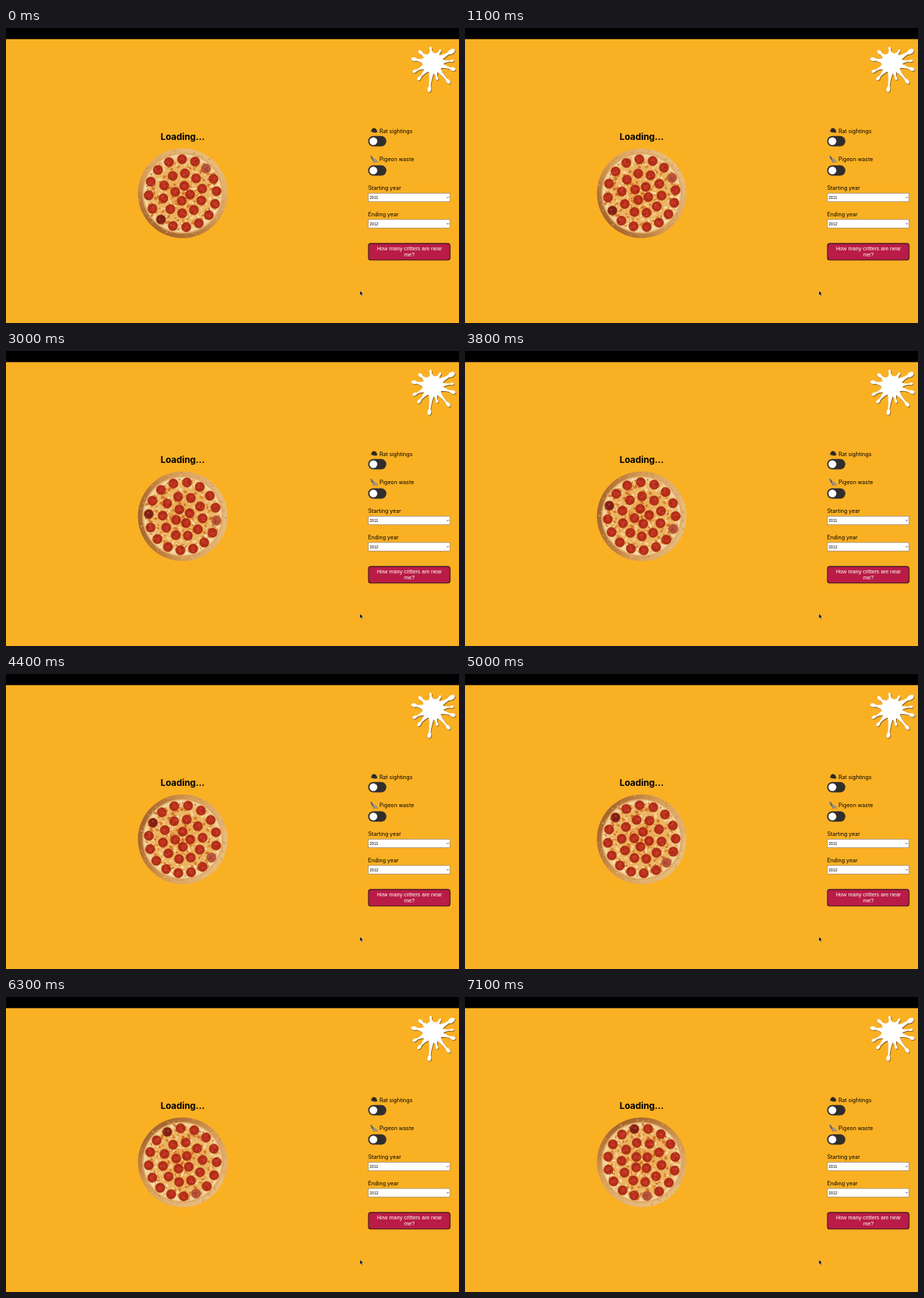
Animation, 600 px wide and 390 px high, one loop 7.2 s. Source, as an HTML page:

```html
<!DOCTYPE html>
<html lang="en">
<head>
<meta charset="utf-8">
<title>Loading</title>
<style>
  html, body { margin: 0; width: 100%; height: 100%; overflow: hidden; background: #fab023; }
  svg { display: block; width: 100%; height: 100%; }
  .label { font: 7.2px Inter, sans-serif; }
  .title { font: 700 11.9px Inter, sans-serif; text-anchor: middle; }
  .field { font: 5.2px "Liberation Sans", Arial, sans-serif; }
  .button { font: 7.2px "Liberation Sans", Arial, sans-serif; fill: #fff; text-anchor: middle; }
</style>
</head>
<body>
<svg viewBox="0 0 600 390" xmlns="http://www.w3.org/2000/svg">
  <defs>
    <linearGradient id="crust" x1="0.75" y1="0.05" x2="0.25" y2="0.95">
      <stop offset="0" stop-color="#e8bd80"/>
      <stop offset="0.55" stop-color="#d79c55"/>
      <stop offset="1" stop-color="#a2632c"/>
    </linearGradient>
    <radialGradient id="cheese">
      <stop offset="0" stop-color="#e9a24a"/>
      <stop offset="0.8" stop-color="#ecb868"/>
      <stop offset="0.94" stop-color="#f3d8a6"/>
      <stop offset="1" stop-color="#d8984f"/>
    </radialGradient>
    <radialGradient id="meat">
      <stop offset="0" stop-color="#c63a25"/>
      <stop offset="0.7" stop-color="#b92d1a"/>
      <stop offset="1" stop-color="#8d2212"/>
    </radialGradient>
    <filter id="shade" x="-20%" y="-20%" width="140%" height="140%">
      <feDropShadow dx="0.7" dy="0.9" stdDeviation="0.5" flood-color="#4a3000" flood-opacity="0.8"/>
    </filter>
  </defs>

  <rect width="600" height="390" fill="#fab023"/>
  <rect width="600" height="14.7" fill="#000"/>
  <text class="title" x="234" y="147.9">Loading...</text>

  <g id="pizza"></g>
  <g id="splat" fill="#fff" filter="url(#shade)"></g>

  <!-- rat -->
  <g fill="#2b2825">
    <path d="M484 137.2C483.6 134 485.6 132 488 132.4C490.2 132.7 491 134.4 491.5 136.2L492 137.6L489.5 138.2L486 137.8Z"/>
    <path d="M484.4 137.4Q482.4 137.2 482.6 135.4M487 138.4h4" fill="none" stroke="#7d645a" stroke-width=".5"/>
  </g>
  <!-- pigeon -->
  <g>
    <path d="M482 168.7L484.3 169.1L486.4 172L490.8 174.8L493 178.2L489.4 177.2C486.3 177 484.2 175 483.8 171.2Z" fill="#77777a"/>
    <path d="M485.6 172.5L490 175.2L492 177.4L488.2 175.8Z" fill="#b7b4b0"/>
    <path d="M483.7 170.2L485.4 173.7" stroke="#48515a" stroke-width="1.2"/>
    <path d="M486.8 176.5l-.5 2M488.4 177l-.3 1.6" stroke="#a5523f" stroke-width=".6"/>
  </g>

  <text class="label" x="494.7" y="139">Rat sightings</text>
  <text class="label" x="494.7" y="175.6">Pigeon waste</text>
  <text class="label" x="479.7" y="214.4">Starting year</text>
  <text class="label" x="479.7" y="249.2">Ending year</text>
  <g id="controls"></g>

  <rect x="480.1" y="284.9" width="108" height="21.8" rx="3" fill="#b91c46" stroke="#3b1420" stroke-width="1.1"/>
  <text class="button" x="534.3" y="294.2">How many critters are near</text>
  <text class="button" x="534.3" y="302.2">me?</text>

  <path d="M468.8 347.2v6.2l1.4-1.2l1 2.2l1.1-.5l-1-2.1h1.9Z" fill="#000" stroke="#fff" stroke-width=".4"/>
</svg>
<script>
const LOOP = 7200, STEP = 100, SPEED = 18; // ms, ms, degrees per second
const CX = 234, CY = 218.5, RAD = Math.PI / 180;

const get = id => document.getElementById(id);
const pizza = get("pizza"), splat = get("splat"), controls = get("controls");

function add(parent, tag, attrs, text) {
  const el = document.createElementNS("http://www.w3.org/2000/svg", tag);
  for (const key in attrs) el.setAttribute(key, attrs[key]);
  if (text) el.textContent = text;
  return parent.appendChild(el);
}
const dot = (parent, cx, cy, r, attrs) => add(parent, "circle", { cx, cy, r, ...attrs });

let seed = 17;
function rand(lo = 0, hi = 1) {
  seed = (seed * 16807) % 2147483647;
  return lo + (hi - lo) * seed / 2147483647;
}

function scatter(count, inner, outer, size, colors, opacity) {
  for (let i = 0; i < count; i++) {
    const a = rand(0, 360), r = Math.sqrt(rand(inner ** 2, outer ** 2));
    const x = CX + r * Math.cos(a * RAD), y = CY + r * Math.sin(a * RAD);
    add(pizza, "ellipse", {
      cx: x, cy: y, rx: size * rand(0.6, 1.4), ry: size * rand(0.4, 0.9),
      transform: `rotate(${rand(0, 180)} ${x} ${y})`,
      fill: colors[i % colors.length], opacity
    });
  }
}

function pepperoni(x, y, fill) {
  dot(pizza, x, y, 6.4, { fill, stroke: "#cf6a25", "stroke-width": 0.6 });
  for (let i = 0; i < 7; i++) {
    dot(pizza, x + rand(-4, 4), y + rand(-4, 4), rand(0.4, 1.1),
      { fill: i % 2 ? "#dc6248" : "#8f1f10", opacity: 0.65 });
  }
}

function ring(count, radius, phase, odd = {}) {
  for (let i = 0; i < count; i++) {
    const turn = 360 / count * i;
    const a = (phase + turn + 2.5 * Math.cos(turn * RAD)) * RAD;
    pepperoni(CX + radius * Math.cos(a), CY + radius * Math.sin(a), odd[i] || "url(#meat)");
  }
}

function drawPizza() {
  dot(pizza, CX, CY, 59.3, { fill: "url(#crust)" });
  scatter(90, 53, 58, 1.3, ["#edc88f", "#b87b3e", "#dfae6c"], 0.45);
  dot(pizza, CX, CY, 53.5, { fill: "url(#cheese)" });
  scatter(260, 0, 50, 2.1, ["#fae6bb", "#d9781f", "#f5d095", "#c9611a"], 0.75);
  scatter(200, 0, 49, 1, ["#b9481a", "#fcefd2", "#db7f22"], 0.85);
  ring(16, 45, -93.5, { 2: "#b4553c", 10: "#7f2015" });
  ring(10, 26.5, -86);
  ring(4, 10, -80);
}

function drawSplat() {
  const x = 565, y = 46;
  add(splat, "ellipse", { cx: x, cy: y, rx: 13.5, ry: 13 });
  // angle, length, drop radius
  const arms = [
    [-31, 29, 3.1], [-58, 18, 1.6], [-98, 19, 1.6], [-139, 21, 2.2], [-169, 25, 2.4], [155, 26, 1.9],
    [131, 27, 2], [97, 35, 2.4], [74, 21, 1.6], [50, 32, 2.2], [17, 28, 2.3], [-6, 26, 1.5]
  ];
  for (const [angle, len, r] of arms) {
    const arm = add(splat, "g", { transform: `translate(${x} ${y}) rotate(${angle})` });
    const w = r * 0.45;
    add(arm, "path", { d: `M10 -5Q15 ${-w} ${len} ${-w}V${w}Q15 ${w} 10 5Z` });
    add(arm, "ellipse", { cx: len, cy: 0, rx: r * 1.6, ry: r });
  }
}

function drawToggle(y) {
  add(controls, "rect", { x: 479.6, y: y - 6.8, width: 24.2, height: 13.6, rx: 6.8, fill: "#302e2d" });
  dot(controls, 486.6, y, 5.2, { fill: "#fff" });
}

function drawSelect(y, value) {
  add(controls, "rect", { x: 480, y, width: 108, height: 11.3, fill: "#fff", stroke: "#85786a", "stroke-width": 0.6 });
  add(controls, "text", { class: "field", x: 481.7, y: y + 7.5 }, value);
  add(controls, "path", { d: `M583.6 ${y + 4.8}l1.5 1.6l1.5-1.6`, fill: "none", stroke: "#333", "stroke-width": 0.7 });
}

function render(ms) {
  // the small lead keeps rounding from dropping a step at its boundary
  const t = Math.floor(((ms + 2) % LOOP) / STEP) * STEP;
  pizza.setAttribute("transform", `rotate(${t / 1000 * SPEED} ${CX} ${CY})`);
}

drawPizza();
drawSplat();
[149.6, 188.4].forEach(drawToggle);
drawSelect(218.4, "2011");
drawSelect(253.1, "2012");

const start = performance.now();
function tick() {
  render(performance.now() - start);
  requestAnimationFrame(tick);
}
tick();
</script>
</body>
</html>
```
